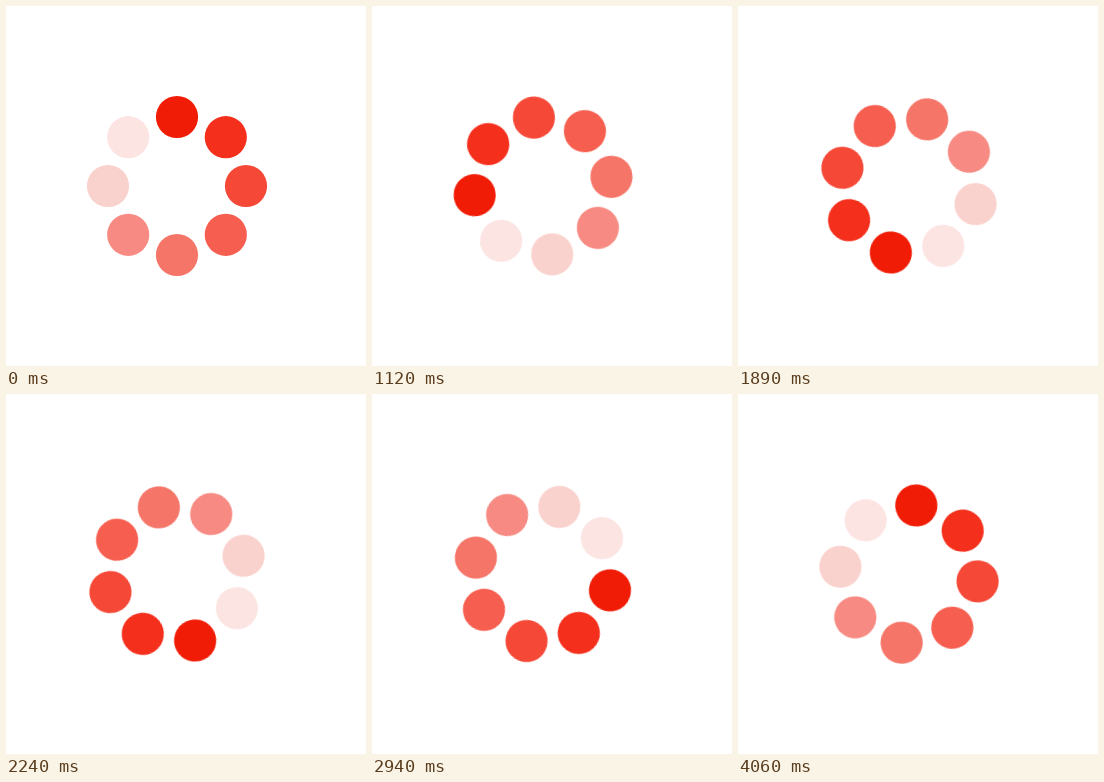
Recreate the animation shown at these times as an HTML page. Size 360 by 360 pixels, loop 4130 ms.

```html
<!DOCTYPE html>
<html lang="en">
<head>
<meta charset="utf-8">
<title>Loading spinner</title>
<style>
  html, body { margin: 0; width: 100%; height: 100%; overflow: hidden; background: #fff; }
  svg { display: block; width: 360px; height: 360px; }

  /* 59 equal steps, one counter-clockwise turn */
  .ring {
    transform-origin: 171px 180px;
    animation: turn 4130ms steps(59) infinite;
  }
  @keyframes turn { to { transform: rotate(-360deg); } }
</style>
</head>
<body>
<svg viewBox="0 0 360 360">
  <defs><circle id="dot" cx="171" cy="111" r="21.1"/></defs>
  <g class="ring">
    <use href="#dot" fill="#f11c05"/>
    <use href="#dot" fill="#f42f1c" transform="rotate(45 171 180)"/>
    <use href="#dot" fill="#f54837" transform="rotate(90 171 180)"/>
    <use href="#dot" fill="#f65e4f" transform="rotate(135 171 180)"/>
    <use href="#dot" fill="#f57568" transform="rotate(180 171 180)"/>
    <use href="#dot" fill="#f78b83" transform="rotate(225 171 180)"/>
    <use href="#dot" fill="#fad2cd" transform="rotate(270 171 180)"/>
    <use href="#dot" fill="#fce4e3" transform="rotate(315 171 180)"/>
  </g>
</svg>
</body>
</html>
```
